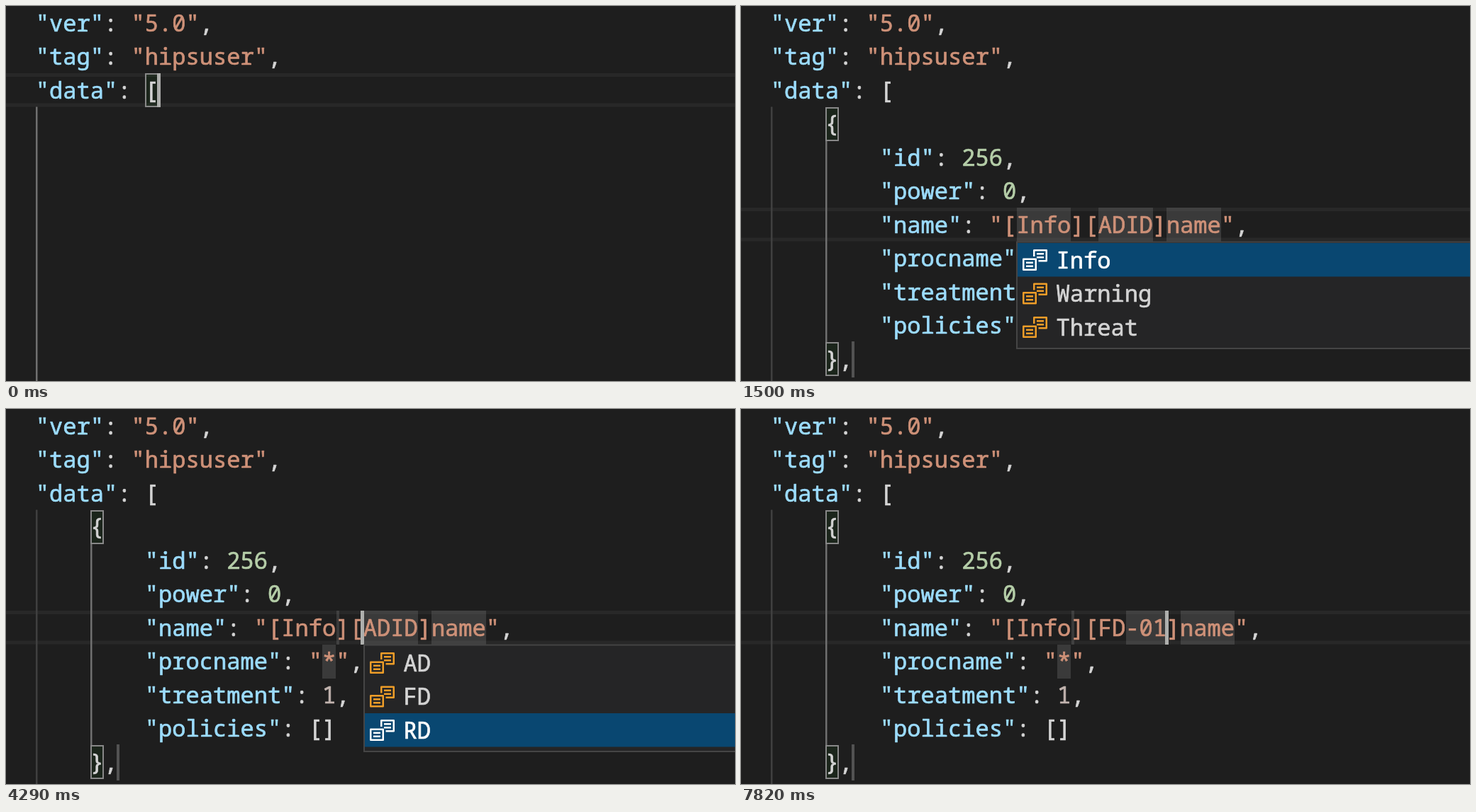
An HTML page with a canvas that plays this animation: 1028x530 px, repeating every 8000 ms.

```html
<!DOCTYPE html>
<html lang="en">
<head>
<meta charset="utf-8">
<title>Snippet completion</title>
<style>
  html, body { margin: 0; width: 1028px; height: 530px; overflow: hidden; background: #1e1e1e; }
  canvas { display: block; }
</style>
</head>
<body>
<canvas id="stage" width="1028" height="530"></canvas>
<script>
const ctx = document.getElementById('stage').getContext('2d');
const LOOP = 8000, W = 1028, H = 530;
const LEFT = 41.7, CHAR = 19.248, LINE = 47.5, BASE = 35.6;
const FONT = "32.08px 'Noto Sans Mono', 'DejaVu Sans Mono', monospace";
const NAME_ROW = 6;
const COLOR = {
  bg: '#1e1e1e', text: '#d4d4d4', key: '#9cdcfe', string: '#ce9178', number: '#b5cea8',
  dimNumber: '#c1b3ae', guide: '#404040', activeGuide: '#707070', line: '#282828',
  cursor: '#aeafad', placeholder: 'rgba(124,124,124,.3)', selection: '#264f78',
  occurrence: 'rgba(173,214,255,.15)', finalStop: '#525252',
  bracket: '#888888', bracketFill: 'rgba(0,100,0,.1)',
  popup: '#252526', popupBorder: '#454545', active: '#094771', icon: '#ee9d28'
};

const levels = { col: 18, row: NAME_ROW, items: ['Info', 'Warning', 'Threat'], active: 0 };
const codes = { col: 24, row: NAME_ROW, items: ['AD', 'FD', 'RD'], active: 2 };
const snippet = { col: 4, row: 3, items: ['rule'], active: 0, snippet: true };

// Each step changes part of the editor state and keeps the rest.
const steps = [
  [0, { row: 2, col: 9, on: true, typed: '', inserted: false, colored: false, brackets: 'data',
        popup: null, code: 'AD', suffix: 'ID', infoDone: false, codeDone: false, selected: false }],
  [240, { row: 3, col: 4 }],
  [370, { typed: 'r', col: 5 }],
  [850, { popup: snippet, on: false }],
  [1310, { inserted: true, popup: null, row: NAME_ROW, col: 18, on: true }],
  [1380, { colored: true, brackets: 'object', popup: levels }],
  [1500, { on: false }],
  [1960, { on: true }],
  [2490, { on: false }],
  [2950, { on: true }],
  [3280, { popup: null, infoDone: true, col: 22 }],
  [3810, { on: false }],
  [4290, { popup: codes, col: 24, on: true }],
  [4830, { on: false }],
  [5280, { on: true }],
  [5350, { popup: { ...codes, active: 1 } }],
  [5620, { popup: null, code: 'FD', codeDone: true, col: 26 }],
  [6150, { on: false }],
  [6350, { selected: true, brackets: null, col: 28, on: true }],
  [6810, { on: false }],
  [7290, { on: true }],
  [7400, { suffix: '-', col: 27, selected: false }],
  [7490, { brackets: 'object' }],
  [7690, { suffix: '-0', col: 28 }],
  [7820, { suffix: '-01', col: 29 }]
];

const stateAt = t => Object.assign({}, ...steps.filter(([at]) => at <= t).map(([, change]) => change));
const colX = col => LEFT + col * CHAR;

function rect(x, y, w, h, color) {
  ctx.fillStyle = color;
  ctx.fillRect(x, y, w, h);
}

// A thin outline thickens the regular weight slightly.
function text(str, x, y, color) {
  ctx.fillStyle = ctx.strokeStyle = color;
  ctx.lineWidth = 0.7;
  ctx.lineJoin = 'round';
  ctx.fillText(str, x, y);
  ctx.strokeText(str, x, y);
}

function mark(row, from, to, color) {
  const x = Math.ceil(colX(from));
  rect(x, Math.round(row * LINE), Math.max(4, Math.round(colX(to)) - x), 48, color);
}

function tokenColor(token, isKey) {
  if (token[0] === '"') return isKey ? COLOR.key : COLOR.string;
  if (/^\d/.test(token)) return token === '1' ? COLOR.dimNumber : COLOR.number;
  return COLOR.text;
}

function codeLine(row, col, str, colored) {
  for (const m of str.matchAll(/"[^"]*"|\d+|[^"\d]+/g)) {
    const isKey = str[m.index + m[0].length] === ':';
    const color = colored ? tokenColor(m[0], isKey) : COLOR.text;
    text(m[0], colX(col + m.index), row * LINE + BASE, color);
  }
}

function bracketBox(row, col) {
  const x = Math.round(colX(col)), y = Math.round(row * LINE);
  rect(x, y, 19, 48, COLOR.bracketFill);
  ctx.strokeStyle = COLOR.bracket;
  ctx.lineWidth = 2;
  ctx.lineJoin = 'miter';
  ctx.strokeRect(x + 1, y + 1, 17, 46);
}

function icon(x, y, color, isSnippet) {
  ctx.save();
  ctx.translate(x, y);
  ctx.scale(2.5, 2.5);
  ctx.strokeStyle = color;
  ctx.lineWidth = 1;
  ctx.beginPath();
  if (isSnippet) {
    ctx.moveTo(2.5, 12);
    ctx.lineTo(2.5, 2.5);
    ctx.lineTo(13.5, 2.5);
    ctx.lineTo(13.5, 12);
    ctx.stroke();
    for (let i = 2; i < 14; i += 2) rect(i, 13, 1, 1, color);
  } else {
    ctx.moveTo(7.5, 6);
    ctx.lineTo(7.5, 2.5);
    ctx.lineTo(14.5, 2.5);
    ctx.lineTo(14.5, 8.5);
    ctx.lineTo(10, 8.5);
    ctx.stroke();
    ctx.strokeRect(1.5, 7.5, 7, 6);
    for (const [lx, ly] of [[9, 4], [9, 6], [3, 9], [3, 11]]) rect(lx, ly, 4, 1, color);
  }
  ctx.restore();
}

function drawPopup({ col, row, items, active, snippet }) {
  const x = Math.round(colX(col)), y = (row + 1) * LINE, h = items.length * LINE + 10;
  rect(x, y, W, h, COLOR.popupBorder);
  rect(x + 2, y + 2, W, h - 4, COLOR.popup);
  items.forEach((label, i) => {
    const top = y + 2.5 + i * LINE, isActive = i === active;
    if (isActive) rect(x + 2, top, W, LINE, COLOR.active);
    icon(x + 6.5, top + 4, isActive ? '#ffffff' : COLOR.icon, snippet);
    text(label, x + 56.5, top + BASE, isActive ? '#ffffff' : COLOR.text);
  });
}

function drawPlaceholders(s) {
  const end = 26 + s.suffix.length;
  if (s.selected) {
    ctx.fillStyle = COLOR.selection;
    ctx.beginPath();
    ctx.roundRect(Math.ceil(colX(26)), NAME_ROW * LINE, 38, 48, 7);
    ctx.fill();
    mark(4, 9, 11, COLOR.occurrence);
  }
  mark(NAME_ROW, s.infoDone ? 22 : 18, 22, COLOR.placeholder);
  mark(NAME_ROW, s.codeDone ? 26 : 24, end, COLOR.placeholder);
  mark(NAME_ROW, end + 1, end + 5, COLOR.placeholder);
  mark(7, 21, 22, COLOR.placeholder);
  rect(156, 474, 4, 51, COLOR.finalStop);
}

function drawGuides(s) {
  rect(42, 3 * LINE, 2.5, H, s.inserted ? COLOR.guide : COLOR.activeGuide);
  if (s.inserted) rect(119, 4 * LINE, 2.5, 6 * LINE, s.selected ? COLOR.guide : COLOR.activeGuide);
}

function drawCode(s) {
  ['"ver": "5.0",', '"tag": "hipsuser",', '"data": [']
    .forEach((str, i) => codeLine(i, 0, str, true));
  if (!s.inserted) {
    codeLine(3, 4, s.typed, false);
    return;
  }
  const fields = ['"id": 256,', '"power": 0,', `"name": "[Info][${s.code}${s.suffix}]name",`,
    '"procname": "*",', '"treatment": 1,', '"policies": []'];
  codeLine(3, 4, '{', false);
  fields.forEach((str, i) => codeLine(4 + i, 8, str, s.colored));
  codeLine(10, 4, '},', false);
}

function draw(t) {
  const s = stateAt(t), y = s.row * LINE;
  ctx.font = FONT;
  ctx.textBaseline = 'alphabetic';
  rect(0, 0, W, H, COLOR.bg);
  if (!s.selected) {
    rect(0, y, W, 5, COLOR.line);
    rect(0, y + LINE - 5, W, 5, COLOR.line);
  }
  drawGuides(s);
  if (s.inserted) drawPlaceholders(s);
  if (s.brackets === 'data') bracketBox(2, 8);
  if (s.brackets === 'object') {
    bracketBox(3, 4);
    bracketBox(10, 4);
  }
  drawCode(s);
  if (s.on) {
    const x = Math.round(Math.round((colX(s.col) - 2.5) / 2.5) * 2.5);
    rect(x, Math.round(y), 5, 48, COLOR.cursor);
  }
  if (s.popup) drawPopup(s.popup);
}

const start = performance.now();
function tick() {
  draw((performance.now() - start) % LOOP);
  requestAnimationFrame(tick);
}
tick();
</script>
</body>
</html>
```
